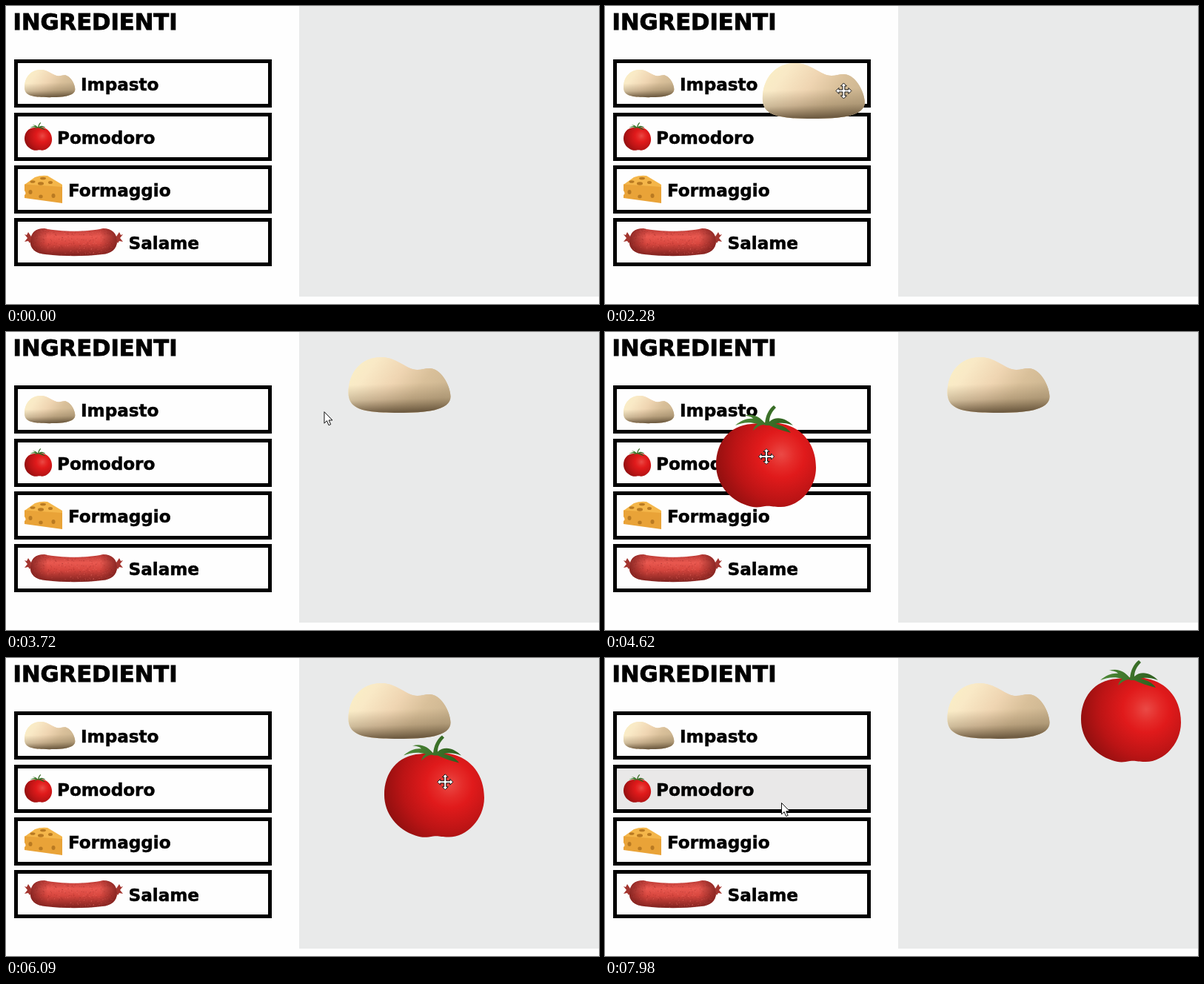
These frames come from a looping animation (801x402 px, 8 s). An HTML page:

```html
<!DOCTYPE html>
<html lang="it">
<head>
<meta charset="utf-8">
<title>Ingredienti</title>
<style>
  html, body { margin: 0; width: 100%; height: 100%; overflow: hidden; background: #fefefe; }
  svg { display: block; width: 801px; height: 402px; }
  text { font: bold 23.1px "DejaVu Sans", Verdana, sans-serif; stroke: #000; stroke-width: .5; }
  .title { font-size: 30.6px; stroke-width: .9; }
  .row { fill: #fefefe; stroke: #000; stroke-width: 5; }
  .row.hover { fill: #e9e8e8; }
</style>
</head>
<body>
<svg viewBox="0 0 801 402">
  <defs>
    <linearGradient id="doughBase" x1="0" y1=".1" x2="1" y2=".5">
      <stop offset="0" stop-color="#faf0c6"/>
      <stop offset=".22" stop-color="#f9e9c6"/>
      <stop offset=".5" stop-color="#efd5b2"/>
      <stop offset=".75" stop-color="#d9c09a"/>
      <stop offset="1" stop-color="#cdb691"/>
    </linearGradient>
    <linearGradient id="doughShade" x1="0" y1="0" x2=".06" y2="1">
      <stop offset=".5" stop-color="#6b573a" stop-opacity="0"/>
      <stop offset=".78" stop-color="#6b573a" stop-opacity=".3"/>
      <stop offset="1" stop-color="#5e4c34" stop-opacity=".85"/>
    </linearGradient>
    <radialGradient id="dimple">
      <stop offset="0" stop-color="#8f7550" stop-opacity=".5"/>
      <stop offset="1" stop-color="#8f7550" stop-opacity="0"/>
    </radialGradient>
    <radialGradient id="tomatoSkin" gradientUnits="userSpaceOnUse" cx="88" cy="66" r="106">
      <stop offset="0" stop-color="#ea4a46"/>
      <stop offset=".17" stop-color="#e52b29"/>
      <stop offset=".3" stop-color="#e01a1b"/>
      <stop offset=".6" stop-color="#bb1415"/>
      <stop offset=".88" stop-color="#8d0f0f"/>
      <stop offset="1" stop-color="#820d0d"/>
    </radialGradient>
    <linearGradient id="leaf">
      <stop offset="0" stop-color="#4f8a38"/>
      <stop offset="1" stop-color="#2c5e1d"/>
    </linearGradient>
    <linearGradient id="salameSkin" x2="0" y2="1">
      <stop offset="0" stop-color="#b93a35"/>
      <stop offset=".3" stop-color="#e9584f"/>
      <stop offset=".55" stop-color="#d8473f"/>
      <stop offset="1" stop-color="#7d211e"/>
    </linearGradient>
    <linearGradient id="salameEnds">
      <stop offset="0" stop-color="#6f1a18" stop-opacity=".75"/>
      <stop offset=".2" stop-color="#6f1a18" stop-opacity="0"/>
      <stop offset=".8" stop-color="#6f1a18" stop-opacity="0"/>
      <stop offset="1" stop-color="#6f1a18" stop-opacity=".75"/>
    </linearGradient>
    <clipPath id="salameClip"><use href="#salameBody"/></clipPath>

    <g id="dough">
      <path id="doughShape" fill="url(#doughBase)" d="M0 48C0 20 18 0 44 0C66 0 78 17 93 17C102 17 107 13 115 16C129 21 138 42 138 53C138 72 104 75 68 75C22 75 0 71 0 48Z"/>
      <ellipse cx="99" cy="29" rx="17" ry="13" fill="url(#dimple)" transform="rotate(-35 99 29)"/>
      <use href="#doughShape" style="fill:url(#doughShade)"/>
      <path fill="url(#doughShade)" d="M0 48C0 20 18 0 44 0C66 0 78 17 93 17C102 17 107 13 115 16C129 21 138 42 138 53C138 72 104 75 68 75C22 75 0 71 0 48Z"/>
    </g>

    <g id="tomato">
      <path fill="url(#tomatoSkin)" d="M0 80C0 50 18 27 48 25C62 23 76 22 90 25C118 31 135 54 135 84C135 114 110 138 86 137C77 137 74 135 66 136C57 138 50 138 42 135C18 127 0 106 0 80Z"/>
      <path fill="url(#leaf)" d="M66 24C67 14 71 5 78 0L81 3C75 9 72 15 72 22C82 13 95 18 104 27C94 23 86 23 80 25C90 27 97 31 101 37C90 34 80 31 72 27C69 27 66 27 64 26C58 27 54 30 50 34C51 30 53 27 56 25C45 22 36 23 26 27C34 20 43 17 50 18C48 15 43 14 38 14C50 10 60 16 66 24Z"/>
    </g>

    <g id="cheese">
      <path fill="#f4b64a" d="M0 12L14 2Q22 -1 31 0L51 12V16L0 15Z"/>
      <path fill="#e9a338" d="M0 11.500L51 15V37L0 30V26Q3 24 0 20Z"/>
      <g fill="#b97a22">
        <ellipse cx="25" cy="3.500" rx="4" ry="1.800"/>
        <ellipse cx="11" cy="8" rx="3.500" ry="1.800"/>
        <ellipse cx="22" cy="10.500" rx="4" ry="2.200"/>
        <ellipse cx="35" cy="9" rx="3" ry="2"/>
        <ellipse cx="8" cy="22" rx="2.500" ry="3"/>
        <ellipse cx="22" cy="28" rx="2.700" ry="2.500"/>
        <ellipse cx="39" cy="27" rx="2.500" ry="3"/>
      </g>
    </g>

    <g id="salame">
      <path id="salameTie" fill="#a3352f" d="M11 14L5 5L3 9L0 8L4 13L0 18L5 17L7 20Z"/>
      <use href="#salameTie" transform="matrix(-1 0 0 1 133 0)"/>
      <path id="salameBody" fill="url(#salameSkin)" d="M8 17C9 5 15 0 27 0C50 5 84 5 106 0C118 0 125 7 125 17C125 28 117 34 105 35C80 38 54 38 28 35C15 34 7 27 8 17Z"/>
      <g id="specks" clip-path="url(#salameClip)"></g>
      <rect x="8" width="117" height="37" fill="url(#salameEnds)" clip-path="url(#salameClip)"/>
    </g>
  </defs>

  <rect x="396" width="405" height="392" fill="#e9eaea"/>
  <text class="title" x="9.500" y="32">INGREDIENTI</text>
  <g id="rows"></g>
  <use id="doughPiece" href="#dough"/>
  <use id="tomatoPiece" href="#tomato"/>
  <g id="pointer" fill="#fff" stroke="#111" stroke-width="1" stroke-linejoin="round">
    <path id="arrow" d="M.5 .5V16L4 12.500L6.500 18.500L9.200 17.500L6.700 11.800H11.500Z"/>
    <path id="move" d="M0-10.500L4-6.500H1.500V-1.500H6.500V-4L10.500 0L6.500 4V1.500H1.500V6.500H4L0 10.500L-4 6.500H-1.500V1.500H-6.500V4L-10.500 0L-6.500-4V-1.500H-1.500V-6.500H-4Z"/>
  </g>
</svg>
<script>
const $ = id => document.getElementById(id);
const LOOP = 8000, LAG = 45;

// Ingredient rows: name, top, text x, icon id, icon y, icon scale
const ROWS = [
  ['Impasto', 72, 101, 'dough', 86, .495],
  ['Pomodoro', 144, 69, 'tomato', 157, .275],
  ['Formaggio', 215, 84, 'cheese', 229, 1],
  ['Salame', 286, 165.5, 'salame', 300, 1],
];
$('rows').innerHTML = ROWS.map(([name, top, x, icon, y, scale]) =>
  `<rect class="row" x="13.5" y="${top + 2.5}" width="343" height="60"/>
   <use href="#${icon}" transform="translate(25 ${y}) scale(${scale})"/>
   <text x="${x}" y="${top + 42}">${name}</text>`).join('');
const boxes = [...document.querySelectorAll('.row')];

// Seeded grain on the sausage
let seed = 7;
const rand = () => (seed = seed * 16807 % 2147483647) / 2147483647;
$('specks').innerHTML = Array.from({ length: 420 }, (_, i) =>
  `<circle cx="${8 + rand() * 117}" cy="${rand() * 37}" r=".6" fill="${i % 2 ? '#8a2521' : '#f0736a'}" opacity=".4"/>`).join('');

// Pointer path: time, x, y
const PATH = [
  [90, 748, 61], [350, 560, 98], [500, 377, 118], [640, 200, 113], [840, 93, 101],
  [960, 93, 101], [1050, 80, 101], [1830, 80, 101], [2150, 219, 113], [2400, 420, 115],
  [2625, 541, 106], [2835, 561, 93], [2880, 564, 91], [2990, 559, 84], [3255, 532, 71],
  [3510, 532, 71], [3720, 430, 107], [3960, 270, 152], [4170, 218, 168], [5130, 218, 168],
  [5455, 228, 182], [5645, 250, 201], [5715, 299, 202], [5760, 365, 202], [5895, 514, 192],
  [6200, 620, 154], [6525, 666, 127], [6570, 679, 114], [6705, 687, 103], [7130, 711, 72],
  [7320, 711, 72], [7480, 600, 120], [7640, 410, 167], [7700, 363, 178], [7980, 238, 195],
];

const secant = (i, k) => (PATH[i + 1][k] - PATH[i][k]) / (PATH[i + 1][0] - PATH[i][0]);
function slope(i, k) {
  if (i === 0 || i === PATH.length - 1) return 0;
  const a = secant(i - 1, k), b = secant(i, k);
  return a * b <= 0 ? 0 : 2 * a * b / (a + b);
}

// Smooth interpolation without overshoot
function pointerAt(t) {
  const end = PATH[PATH.length - 1];
  if (t >= end[0]) return end.slice(1);
  if (t <= PATH[0][0]) return PATH[0].slice(1);
  const i = PATH.findIndex(p => p[0] > t) - 1;
  const [p, q] = [PATH[i], PATH[i + 1]], h = q[0] - p[0], u = (t - p[0]) / h;
  return [1, 2].map(k => {
    const s = u * u * (3 - 2 * u);
    return p[k] + (q[k] - p[k]) * s
      + h * u * (1 - u) * ((1 - u) * slope(i, k) - u * slope(i + 1, k));
  });
}

const place = (el, x, y) => el.setAttribute('transform', `translate(${x} ${y})`);
const show = (el, on) => { el.style.display = on ? '' : 'none'; };
const within = (t, a, b) => t >= a && t < b;

function drawPiece(el, t, grab, drop, dx, dy) {
  const [x, y] = pointerAt(Math.min(t - LAG, drop));
  show(el, t >= grab);
  place(el, x - dx, y - dy);
}

function frame() {
  const t = performance.now() % LOOP;
  const [x, y] = pointerAt(t);
  const dragging = within(t, 1380, 3300) || within(t, 4470, 7200);
  const moving = within(t, 1380, 3580) || within(t, 4470, 7400);

  boxes.forEach((box, i) => box.classList.toggle('hover',
    t >= 90 && !dragging && x > 11 && x < 359 && within(y, ROWS[i][1], ROWS[i][1] + 65)));
  drawPiece($('doughPiece'), t, 1290, 3300, 69.5, 37);
  drawPiece($('tomatoPiece'), t, 4410, 7200, 68, 69);

  show($('pointer'), t >= 90);
  show($('arrow'), !moving);
  show($('move'), moving);
  place($('pointer'), x, y);
  requestAnimationFrame(frame);
}
frame();
</script>
</body>
</html>
```
